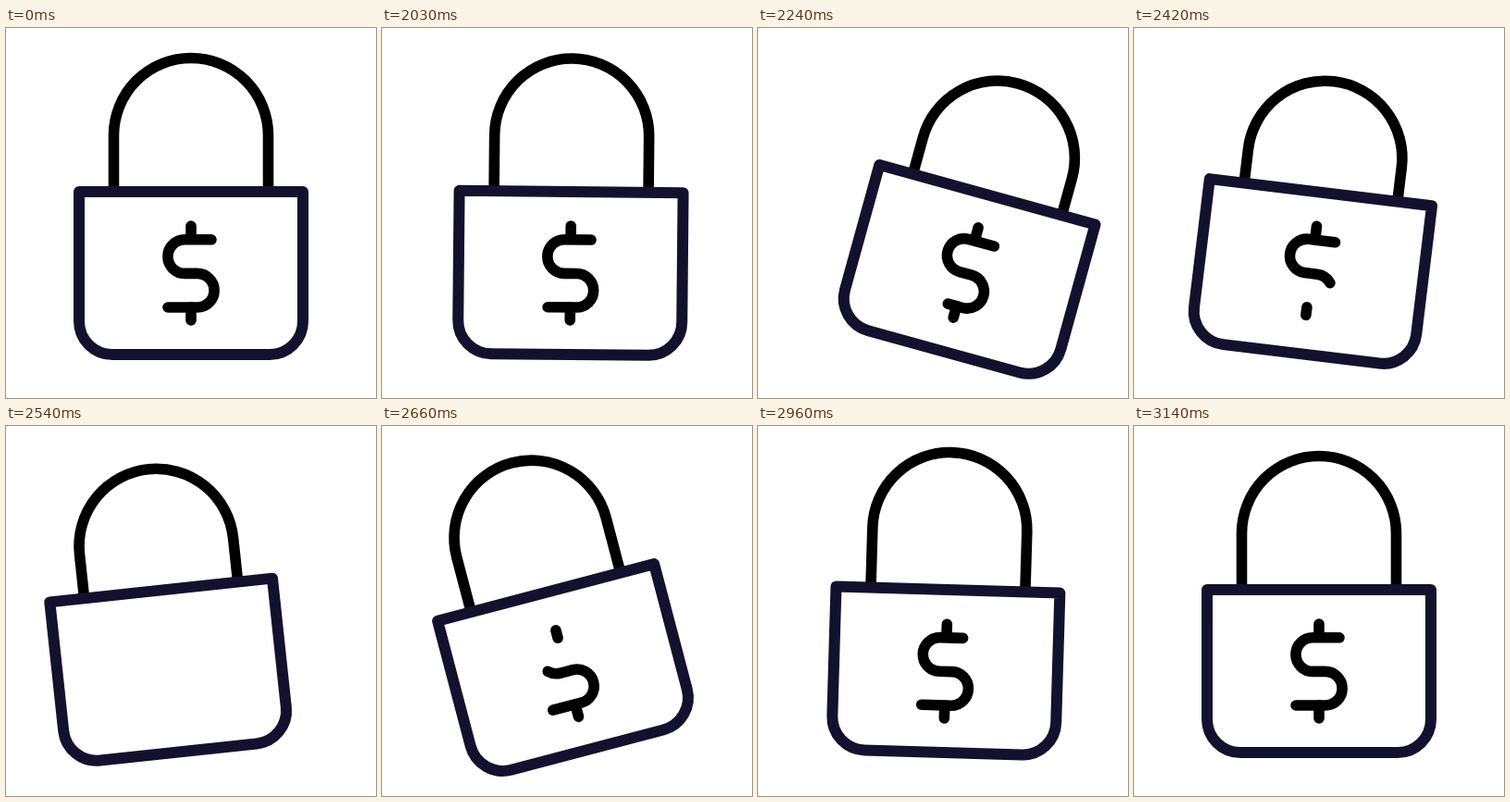
These frames come from a looping animation (400 px wide and 400 px high, 3.17 s). An HTML page:

```html
<!DOCTYPE html>
<html lang="en">
<head>
<meta charset="utf-8">
<title>Padlock</title>
<style>
html, body { margin: 0; width: 100%; height: 100%; overflow: hidden; background: #fff; }
svg { display: block; width: 100vw; height: 100vh; }
path { fill: none; stroke: #000; stroke-width: 11.6; stroke-linecap: round; stroke-linejoin: round; }
#body { fill: #fff; stroke: #12122f; stroke-width: 12; }
</style>
</head>
<body>
<svg viewBox="0 0 400 400">
  <g id="lock">
    <path id="shackle" d="M116.5 200V116a83.5 83.5 0 0 1 167 0V200"/>
    <path id="body" d="M79 177H321V317a36 36 0 0 1-36 36H115a36 36 0 0 1-36-36Z"/>
    <g id="dollar">
      <path pathLength="100" d="M200 214V228"/>
      <path pathLength="100" d="M222 228.8H193.2a18.3 18.3 0 0 0 0 36.6H206.8a18.3 18.3 0 0 1 0 36.6H175"/>
      <path pathLength="100" d="M200 302V316"/>
    </g>
  </g>
</svg>
<script>
const LOOP = 3170, START = 2000, HALF = 540, END = 1090;
const el = id => document.getElementById(id);
const lock = el('lock'), shackle = el('shackle'), strokes = [...el('dollar').children];

const clamp = p => Math.min(1, Math.max(0, p));
const smooth = p => p * p * (3 - 2 * p);
const easeIn = p => Math.expm1(4.25 * p) / Math.expm1(4.25);

// A swing from rest through [ms, value] peaks, eased in and out of each.
const swing = (...keys) => t => keys.reduce((v, [time, to], i) => {
  if (i === 0) return to;
  const from = keys[i - 1][0];
  return v + (to - keys[i - 1][1]) * smooth(clamp((t - from) / (time - from)));
}, 0);

// Times count from START.
const turn = swing([0, 0], [270, 16], [690, -15.2], [850, 3], [END, 0]);
const shift = swing([-25, 0], [205, 26], [540, -23], [730, 9.5], [END, 0]);
const slide = swing([0, 0], [350, 26], [810, -9], [END, 0]);

function trim(from, to) {
  const len = to - from;
  for (const s of strokes) {
    s.style.visibility = len < .3 ? 'hidden' : 'visible';
    s.setAttribute('stroke-dasharray', `${len} 300`);
    s.setAttribute('stroke-dashoffset', -from);
  }
}

function draw(ms) {
  const t = ms % LOOP - START;
  lock.setAttribute('transform', `translate(${shift(t)} 0) rotate(${turn(t)} 200 265)`);
  shackle.setAttribute('transform', `translate(0 ${slide(t)})`);
  // Each stroke is wiped away from its end, then drawn back from its end.
  const gone = 100 * easeIn(clamp(1 - Math.abs(t / HALF - 1)));
  if (t < HALF) trim(0, 100 - gone);
  else trim(gone, 100);
}

let begin;
function frame(now) {
  begin ??= now;
  draw(now - begin);
  requestAnimationFrame(frame);
}
draw(0);
requestAnimationFrame(frame);
</script>
</body>
</html>
```
